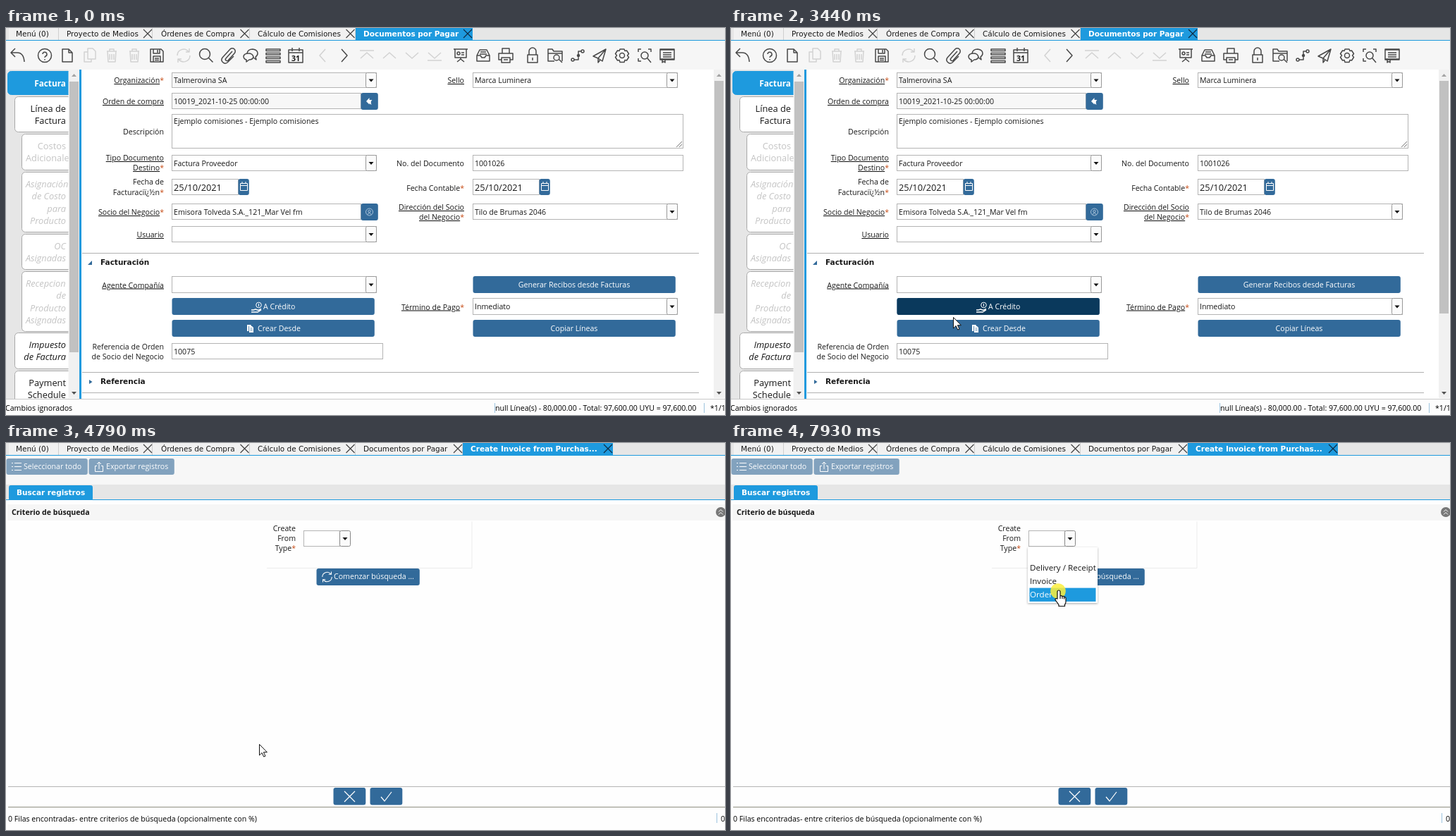
Animation, 1020 px wide and 549 px high, one loop 8 s. Source, as an HTML page:

```html
<!DOCTYPE html>
<html lang="es">
<head>
<meta charset="utf-8">
<title>Documentos por Pagar</title>
<style>
html, body { margin: 0; width: 100%; height: 100%; overflow: hidden; background: #fff; }
svg { display: block; width: 100vw; height: 100vh; }
text { font: 10.6px "Open Sans", "Noto Sans", sans-serif; fill: #181818; white-space: pre; }
.end { text-anchor: end; }
.mid { text-anchor: middle; }
.bold { font-weight: 700; }
.black { fill: #000; font-weight: 500; }
.white { fill: #fff; }
.date { font-size: 12.8px; }
.item { font-size: 11.6px; }
.side { font-size: 12.8px; text-anchor: end; }
.off { fill: #c4c4c4; }
.it { font-style: italic; }
.tab { font: 10.45px "DejaVu Sans", sans-serif; }
.head { font: bold 10.5px "DejaVu Sans", sans-serif; }
.u { text-decoration: underline; }
.req { fill: #c8501c; }
.icon { fill: none; stroke: #484848; stroke-width: 1.5; stroke-linejoin: round; }
.icon.dim { stroke: #d2d2d2; }
</style>
</head>
<body>
<svg id="stage" viewBox="0 0 1020 549"></svg>
<script>
const BLUE = '#1e9ade', STEEL = '#326a9a', DARK = '#0a395c', LOOP = 8000;

const rect = (x1, y1, x2, y2, fill, extra = '') =>
  `<rect x="${x1}" y="${y1}" width="${x2 - x1}" height="${y2 - y1}" fill="${fill}" ${extra}/>`;
const box = (x1, y1, x2, y2, fill = '#fff', line = '#b4b4b4', r = 0) =>
  rect(x1 + .5, y1 + .5, x2 - .5, y2 - .5, fill, `stroke="${line}" rx="${r}"`);
const text = (x, y, s, cls = '') => `<text x="${x}" y="${y}" class="${cls}">${s}</text>`;
const line = (d, color = '#fff', w = 1) =>
  `<path d="${d}" fill="none" stroke="${color}" stroke-width="${w}"/>`;
const fill = (d, color) => `<path d="${d}" fill="${color}"/>`;
const group = (id, body, extra = '') => `<g id="${id}" ${extra}>${body}</g>`;
const at = (x, y, body) => `<g transform="translate(${x} ${y})">${body}</g>`;

const label = (x, y, s, linked, required) => text(x, y,
  `<tspan class="${linked ? 'u' : ''}">${s}</tspan>${required ? '<tspan class="req">*</tspan>' : ''}`, 'end');
const field = (x1, y1, x2, y2, s = '', bg = '#fff') => box(x1, y1, x2, y2, bg) + text(x1 + 3, (y1 + y2) / 2 + 4, s);
const arrow = (x, y) => fill(`M${x - 3.5} ${y - 1.5}h7l-3.5 4z`, '#111');
const combo = (x1, y1, x2, y2, s, bg) => field(x1, y1, x2, y2, s, bg) +
  box(x2 - 16, y1, x2, y2, '#fbfbfb', '#999', 2) + arrow(x2 - 8, (y1 + y2) / 2);
const button = (x1, y1, x2, y2, color = STEEL) => rect(x1 + .5, y1, x2 - .2, y2, color, 'rx="3"');
const textButton = (x1, y1, x2, y2, s) => button(x1, y1, x2, y2) + text((x1 + x2) / 2, (y1 + y2) / 2 + 4.3, s, 'mid white');
const dateField = (x, s) => box(x, 214, x + 95, 237) + text(x + 3, 231, s, 'date') +
  button(x + 94, 214, x + 110, 237) +
  line(`M${x + 97.5} 220.5h10v10h-10zM${x + 97.5} 223.5h10M${x + 100} 218v3M${x + 105} 218v3`);

const cross = (x, color) => line(`M${x - 6} 2l12 12M${x + 6} 2l-12 12`, color, 1.2);

function tabs(list) {
  let out = rect(0, 0, 1020, 17, '#e6e6e6');
  list.forEach(([x1, x2, tx, s, cx], i) => {
    const active = i === list.length - 1;
    out += rect(x1, 0, x2, 17, active ? BLUE : '#f1f1f1') +
      (active ? '' : line(`M${x2 - .5} 0v17`, '#cfcfcf')) +
      text(tx, 11.5, s, active ? 'head white' : 'tab') +
      (cx ? cross(cx, active ? '#0d2c45' : '#444') : '');
  });
  return out + rect(0, 17, 1020, 18, BLUE);
}
const baseTabs = [
  [4, 75, 14, 'Menú (0)'], [75, 208, 86, 'Proyecto de Medios', 201],
  [208, 346, 220, 'Órdenes de Compra', 338.5], [346, 496, 357, 'Cálculo de Comisiones', 488.5]];

const circle = (x, y, r) => `M${x - r} ${y}a${r} ${r} 0 1 0 ${2 * r} 0a${r} ${r} 0 1 0 ${-2 * r} 0`;
const TRASH = 'M-7-6h14M-6-6l1 15h10l1-15M-3-6v-3h6v3M-3-2v8M0-2v8M3-2v8';
const CYCLE = 'M-9 0a9 9 0 0 1 16-5.5M8-10v5h-5M9 0a9 9 0 0 1-16 5.5M-8 10v-5h5';
const UP = 'M-9 4l9-8 9 8', DOWN = 'M-9-4l9 8 9-8';
const icons = [
  [17, 'M-4-10l-6 6 6 6M-10-4h9q9 0 10 13'],
  [55, circle(0, 0, 9.5) + 'M-3-2a3 3 0 1 1 4 3q-1 1-1 2M0 5v1.5'],
  [87, 'M-7-9h9l5 5v13h-14zM2-9v5h5'],
  [119, 'M-3-10h7l4 4v11h-11zM-3-5h-5v14h10v-4', 1],
  [150, TRASH, 1], [182, TRASH, 1],
  [214, 'M-9-9h15l3 3v15h-18zM-5-9v6h9v-6M-5 9v-8h10v8M-3 4h6M-3 6.5h6M1-8v4'],
  [252, CYCLE, 1],
  [283, circle(-1, -2, 7.5) + 'M4.5 3.500l6 6'],
  [315, 'M6-6l-9 10a2 2 0 0 0 3 3l9-10a4 4 0 0 0-6-6l-11 12a5 5 0 0 0 7 7l9-9'],
  [347, 'M-5-3q1-6 8-6 7 1 7 6 0 3-3 5l1 4-4-3M-3-3q6 0 7 5-1 4-6 4l-4 3v-3q-4-1-4-5 1-4 7-4'],
  [379, [-9, -3.5, 2, 7.5].map(y => `M-10 ${y}h20v2.500h-20z`).join('')],
  [411, 'M-10-8h20v18h-20zM-10-4h20M-5-11v5M5-11v5'],
  [449, 'M4-9l-8 9 8 9', 1], [480, 'M-4-9l8 9-8 9'],
  [512, 'M-10-7h20' + UP, 1], [544, UP, 1], [576, DOWN, 1], [608, 'M-10 7h20' + DOWN, 1],
  [645, 'M-10-9h20M-8-9v12h16v-12M0 3v2M-5 9l5-4 5 4M1-4h4M1-1h4' + circle(-3, -3, 2)],
  [677, 'M-9 0l4-8h10l4 8v8h-18zM-9 0h5l2 3h4l2-3h5M-4-5h8M-5-2h10'],
  [709, 'M-5-3v-7h10v7M-10-3h20v9h-4v-3h-12v3h-4zM-6 3v7h12v-7M-3 6h6'],
  [747, 'M-7-1h14v11h-14zM-5-1v-5a5 5 0 0 1 10 0v5M0 3v4'],
  [779, 'M-1 8h-9v-17h6l2 3h12v14M-10-3h20M5 5l5 5' + circle(2, 3, 4)],
  [811, 'M-5 6h6v-12h4' + circle(-7, 6, 2) + circle(7, -6, 2) + circle(1, 0, 1.5)],
  [842, 'M-9 1l18-10-5 17-6-4zM-2 4l11-13M-2 4v6l3-4'],
  [874, circle(0, 0, 3.5) + 'M-3-9h6l1 2.500 2.500-.5 3 4.500-2 2.500 2 2.500-3 4.500-2.500-.5-1 3h-6l-1-3-2.500.5-3-4.500 2-2.500-2-2.500 3-4.500 2.500.5z'],
  [906, 'M-9-5v-4h4M5-9h4v4M-9 4v4h4M4 4l5 6' + circle(0, 0, 5)],
  [938, 'M-10-9h20v15h-20zM-10-8h20M-6-4h12M-6-1h12M-6 2h12M-10 5h20M-7 6v4l2-1.500 2 1.500v-4']
];
const toolbar = rect(0, 18, 1020, 59, '#f6f6f6') +
  icons.map(([x, d, dim]) => at(x, 39, `<path class="icon${dim ? ' dim' : ''}" d="${d}"/>`)).join('') +
  text(411, 47, '31', 'mid bold');

const scrollbar = (x, top, end, upColor) => rect(x, 59, x + 15, 525, '#f1f1f1') +
  rect(x + 1, top, x + 14, end, '#c1c1c1') +
  fill(`M${x + 4} 69h7l-3.500-4z`, upColor) + fill(`M${x + 4} 516h7l-3.500 4z`, '#505050');

const sideTabs = [
  [12, 97, 148, ['Línea de', 'Factura'], ''],
  [22, 150, 202, ['Costos', 'Adicionales'], 'off'],
  [22, 204, 290, ['Asignación', 'de Costo', 'para', 'Producto'], 'off it'],
  [22, 292, 343, ['OC', 'Asignadas'], 'off it'],
  [22, 345, 431, ['Recepcion', 'de', 'Producto', 'Asignadas'], 'off it'],
  [12, 432, 484, ['Impuesto', 'de Factura'], 'it'],
  [12, 486, 540, ['Payment', 'Schedule'], '']];
const clipped = ['Adicionales', 'Asignación', 'Recepcion', 'Asignadas'];
const sideText = (s, y, cls) => clipped.includes(s)
  ? `<text x="28" y="${y}" class="side ${cls}" style="text-anchor:start">${s}</text>`
  : text(85, y, s, 'side ' + cls);
const sidebar = group('side', rect(0, 59, 89, 526, '#e6e6e6') +
  box(2, 61, 96, 95, BLUE, BLUE, 5) +
  `<text x="85" y="83" class="end bold white" style="font-size:11.8px">Factura</text>` +
  sideTabs.map(([x, y1, y2, lines, cls]) => box(x, y1, 100, y2, '#fff', '#a8a8a8', 5) +
    lines.map((s, i) => sideText(s, y1 + 22 + i * 17.3, cls)).join('')).join(''),
  'clip-path="url(#sideClip)"');

const handIcon = line('M348 400h3l3-1 4 1.500 4-2M348 403h9l5-3', '#fff', 1.4) + line(circle(358.5, 393, 3.8)) + line('M358.500 391v4');
const copyIcon = fill('M342 421h5l1 1v8h-6z', '#fff') + fill('M345 423h4l2 2v7h-6z', '#fff') + line('M344.500 423v7M346.500 426h3M346.500 428.500h3', STEEL, .8);
const creditButton = color => button(235, 383, 523, 407, color) + handIcon + text(365, 398.5, 'A Crédito', 'white');
const createButton = color => button(235, 414, 523, 438, color) + copyIcon + text(357, 429.5, 'Crear Desde', 'white');

const form = tabs([...baseTabs, [496, 662, 507, 'Documentos por Pagar', 655]]) + toolbar +
  sidebar + scrollbar(89, 76, 460, '#a3a3a3') + rect(104, 59, 107, 526, BLUE) +
  label(224, 78, 'Organización', 1, 1) + combo(235, 63, 526, 85, 'Talmerovina SA', '#f7f7f7') +
  label(650, 78, 'Sello', 1) + combo(662, 63, 953, 85, 'Marca Luminera') +
  label(224, 108, 'Orden de compra', 1) + field(235, 92, 504, 115, '10019_2021-10-25 00:00:00', '#f7f7f7') +
  button(503, 92, 528, 116) + fill('M511 104l4.500-5v3h4q-3 2-1 7l-3-2v1.500z', '#fff') +
  label(224, 151, 'Descripción') + box(235, 122, 961, 171) +
  text(238, 136, 'Ejemplo comisiones - Ejemplo comisiones') + line('M951 169l8-8M955 169l4-4', '#777') +
  label(224, 188, 'Tipo Documento', 1) + label(224, 202, 'Destino', 1, 1) + combo(235, 180, 526, 203, 'Factura Proveedor') +
  label(650, 196, 'No. del Documento') + field(662, 180, 961, 203, '1001026') +
  label(224, 222, 'Fecha de') + label(224, 237, 'Facturaciï¿½n', 0, 1) + dateField(235, '25/10/2021') +
  label(650, 231, 'Fecha Contable', 0, 1) + dateField(662, '25/10/2021') +
  label(224, 265, 'Socio del Negocio', 1, 1) + field(235, 249, 504, 272, 'Emisora Tolveda S.A._121_Mar Vel fm') +
  button(503, 249, 528, 273) + line(circle(515.5, 261, 5) + circle(515.5, 260, 1.7) + 'M512.500 265q3-5 6 0', '#a9c3da') +
  label(650, 258, 'Dirección del Socio', 1) + label(650, 272, 'del Negocio', 1, 1) + combo(662, 249, 953, 272, 'Tilo de Brumas 2046') +
  label(224, 297, 'Usuario', 1) + combo(235, 281, 526, 304) +
  line('M108 319.500h875M108 488.500h875M108 517.500h875', '#b0b0b0') +
  fill('M122 330v6h-6z', STEEL) + text(134, 335.5, 'Facturación', 'head') +
  label(224, 368.5, 'Agente Compañía', 1) + combo(235, 352, 526, 376) +
  textButton(662, 352, 950, 376, 'Generar Recibos desde Facturas') +
  creditButton(STEEL) + createButton(STEEL) +
  group('creditHover', creditButton(DARK)) + group('createHover', createButton(DARK)) +
  group('createPress', createButton('#1b4f78')) +
  label(650, 399.5, 'Término de Pago', 1, 1) + combo(662, 383, 953, 407, 'Inmediato') +
  textButton(662, 414, 950, 438, 'Copiar Líneas') +
  label(224, 456, 'Referencia de Orden') + label(224, 470, 'de Socio del Negocio') + field(235, 447, 535, 470, '10075') +
  fill('M118 499v6l4.500-3z', STEEL) + text(134, 504.5, 'Referencia', 'head') +
  scrollbar(1004, 75, 405, '#a3a3a3') +
  rect(0, 526, 1020, 549, '#fdfdfd') + line('M0 526.500h1020', '#c8c8c8') +
  line('M693.500 532v14M990.500 532v14', '#9cc3de') +
  text(-1, 543, 'Cambios ignorados', 'black') +
  text(694, 543, 'null Línea(s) - 80,000.00 - Total: 97,600.00 UYU = 97,600.00', 'black') +
  text(999, 543, '*1/1', 'black');

const typeBox = box(422, 124, 474, 147) + box(473, 124, 489, 147, '#fbfbfb', '#888', 2) + arrow(481, 135.5);
const typeFocus = rect(423, 125, 473.5, 146, '#fff', 'stroke="#1a1a1a" stroke-width="2" rx="2"') +
  box(473, 124, 489, 147, '#cdcdcd', '#888', 2) + arrow(481, 135.5) + line('M425.500 128v15', '#111');
const items = ['Delivery / Receipt', 'Invoice', 'Order'];
const search = tabs([...baseTabs, [496, 648, 507, 'Documentos por Pagar', 641], [648, 861, 659, 'Create Invoice from Purchas...', 854]]) +
  rect(0, 18, 1020, 59, '#f7f7f7') +
  button(0, 22, 116, 45, '#82a2be') + line('M12 28.500h10M12 33.500h10M12 38.500h10M8 28.500h2M8 33.500h2M8 38.500h2') +
  text(25, 37, 'Seleccionar todo', 'white') +
  button(117, 22, 239, 45, '#82a2be') + line('M129 32.500h-2.500v8h11v-8h-2.500M132 37v-10M129 30l3-3 3 3') +
  text(142, 37, 'Exportar registros', 'white') +
  rect(0, 59, 1020, 80, '#e6e6e6') + box(4, 60, 123, 82, BLUE, BLUE, 2) + rect(0, 80, 1020, 81, BLUE) +
  rect(0, 81, 1020, 549, '#fefefe') + text(15, 74, 'Buscar registros', 'head white') +
  rect(2, 87, 1020, 110, '#f6f6f6') + text(8, 102, 'Criterio de búsqueda', 'bold') +
  fill(circle(1014, 98, 7), '#777') + line('M1011 97.500l3-3 3 3M1011 101.500l3-3 3 3') +
  line('M370 177.500h291v-66', '#ececec') +
  label(411, 124.5, 'Create') + label(411, 139, 'From') + label(411, 153, 'Type', 0, 1) +
  typeBox + group('focus', typeFocus) +
  button(440, 178, 587, 202) + at(455.5, 190, `<g transform="scale(.75)">${line(CYCLE, '#fff', 1.4)}</g>`) +
  text(465, 193, 'Comenzar búsqueda ...', 'white') +
  group('menu', rect(421, 148, 520, 227, '#fff', 'style="filter:drop-shadow(0 1px 1.5px #0005)"') +
    items.map((s, i) => group('mark' + i, rect(423.5, 167 + i * 19.3, 517.5, 186.3 + i * 19.3, BLUE)) +
      `<text id="item${i}" x="424" y="${180.5 + i * 19.3}" class="item">${s}</text>`).join('')) +
  line('M3 487.500h1017', '#b5b5b5') + button(464, 489, 510.5, 513.5) + button(516, 489, 562.5, 513.5) +
  line('M480 494l15 15M495 494l-15 15M532 502l5 6 10-13', '#fff', 1.2) +
  line('M3 516.500h1017', '#8f8f80') +
  text(3, 536.5, '0 Filas encontradas- entre criterios de búsqueda (opcionalmente con %)', 'black') +
  line('M1008.500 525v14', '#9cc3de') + text(1014, 536.5, '0', 'black');

const pointer = '<path d="M.5 .5v15.500l3.600-3.500 2.600 5.600 2.300-1-2.600-5.400h5z" fill="#fff" stroke="#111"/>';
const hand = '<path d="M-2 12v-10a2 2 0 0 1 4 0v6q2-1 3 .6 2-.8 2.600.9 2.400-.4 2.400 2v5q0 2-1.500 3.500v2.500h-8.500v-2l-5-7q-.5-2.500 3-1.500zM2 8v4M5 9v3M7.600 10v2.500" fill="#fff" stroke="#111" stroke-width="1.2"/>';

document.getElementById('stage').innerHTML =
  '<defs><clipPath id="sideClip"><path d="M0 59h88.500v467h-88.500z"/></clipPath></defs>' +
  rect(0, 0, 1020, 549, '#fff') + group('form', form) + group('search', search) +
  group('cursor', group('click', `<circle cy="1" r="10.800" cx="-1" fill="#fbee3c" opacity=".85"/>`) + group('pointer', pointer) + group('hand', hand));

// Cursor legs: start, end, steps, from, to, bend point (optional), ease-out power
const legs = [
  [460, 590, 3, [986, 532], [1010, 538]],
  [920, 1200, 5, [1010, 538], [578, 180], null, 1.5],
  [2650, 3100, 7, [578, 180], [288, 394], null, 1.3],
  [3370, 3650, 5, [288, 394], [359, 427], [321, 416]],
  [5330, 5905, 9, [359, 427], [479, 117], [255, 330]],
  [5975, 6120, 3, [479, 117], [479, 128]],
  [7050, 7600, 9, [479, 128], [465, 209], [481, 160], 2]];

function cursorAt(t) {
  const leg = legs.filter(l => t >= l[0]).pop();
  if (!leg) return null;
  const [start, end, n, from, to, bend, power = 1] = leg;
  const step = Math.min(n, Math.floor((t - start) / (end - start) * (n - 1) + .01) + 1);
  const u = 1 - (1 - step / n) ** power;
  return from.map((a, i) => {
    const mid = bend ? bend[i] : (a + to[i]) / 2;
    return (1 - u) ** 2 * a + 2 * u * (1 - u) * mid + u * u * to[i];
  });
}

const el = id => document.getElementById(id);
const show = (id, on) => { el(id).style.display = on ? '' : 'none'; };
const within = (t, a, b) => t >= a && t < b;

function draw(t) {
  show('form', t < 4790);
  show('search', t >= 4790);
  show('creditHover', within(t, 3035, 3510));
  show('createHover', within(t, 3510, 4790));
  show('createPress', within(t, 4010, 4090));
  show('focus', within(t, 6450, 7930));
  show('menu', t >= 6540);
  const pos = cursorAt(t);
  show('cursor', pos);
  show('click', within(t, 4010, 4170) || within(t, 6450, 6720) || t >= 7800);
  show('pointer', t < 5900);
  show('hand', t >= 5900);
  if (pos) el('cursor').setAttribute('transform', `translate(${pos.map(Math.round).join(' ')})`);
  const row = pos && t >= 7050 ? Math.floor((pos[1] - 167) / 19.3) : -1;
  items.forEach((_, i) => {
    show('mark' + i, i === row);
    el('item' + i).style.fill = i === row ? '#fff' : '';
  });
}

const began = performance.now();
function tick() {
  draw((performance.now() - began) % LOOP);
  requestAnimationFrame(tick);
}
tick();
</script>
</body>
</html>
```
